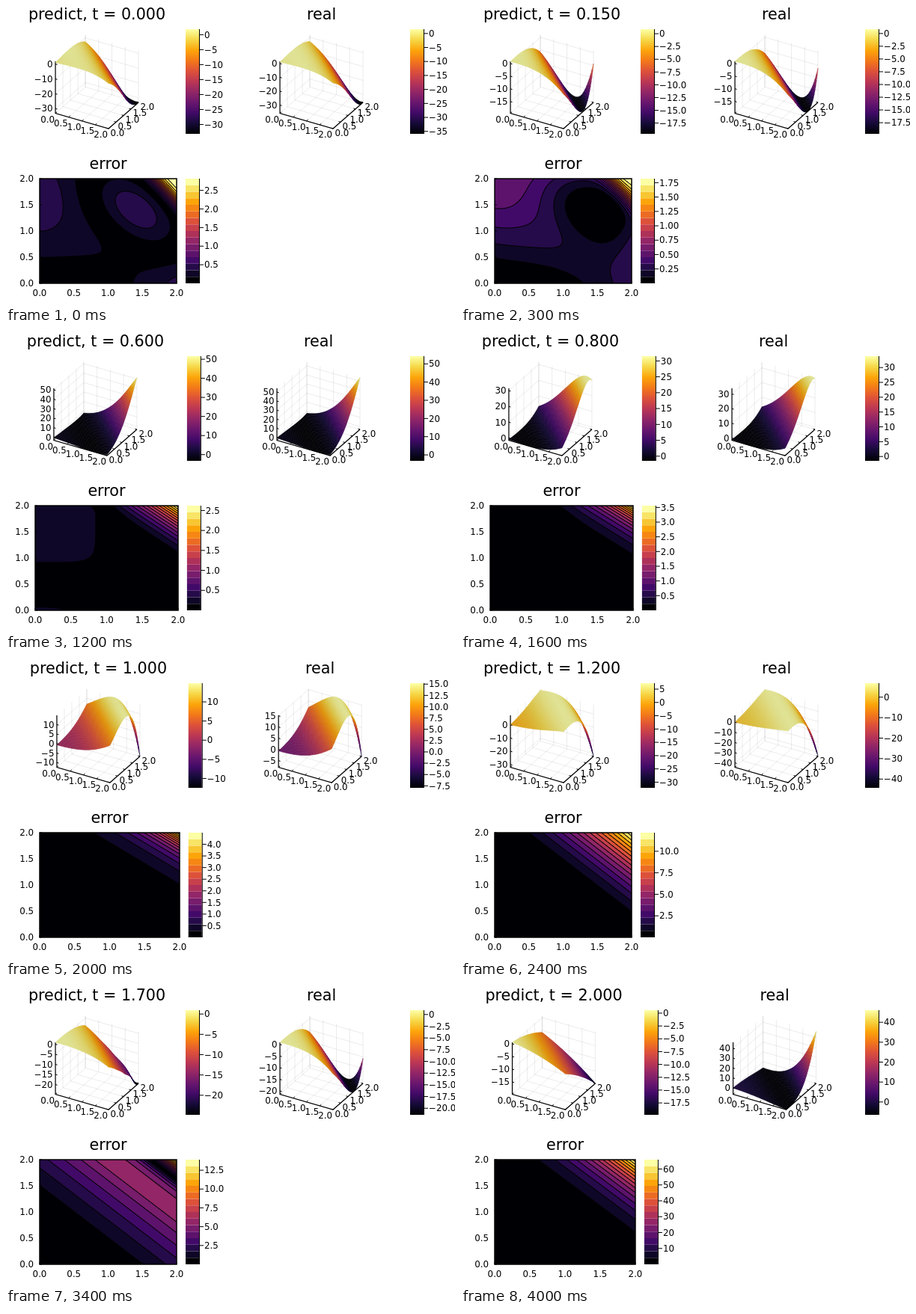
An HTML page with a canvas that plays this animation: 600x400 px, repeating every 4.1 s.

```html
<!DOCTYPE html>
<html lang="en">
<head>
<meta charset="utf-8">
<title>Prediction error</title>
<style>
html, body { margin: 0; width: 100%; height: 100%; overflow: hidden; background: #fff; }
canvas { display: block; }
</style>
</head>
<body>
<canvas id="stage" width="600" height="400"></canvas>
<script>
const ctx = document.getElementById('stage').getContext('2d');
const { exp, cos, max, min, abs, floor, ceil, round } = Math;
const FRAMES = 41, FRAME_MS = 100, CELLS = 40, BANDS = 16, PLOT_H = 140;
const TICK_FONT = '11.8px "DejaVu Sans", sans-serif';
const TITLE_FONT = '20.7px "DejaVu Sans", sans-serif';
const UNIT_TICKS = [0, 0.5, 1, 1.5, 2];
const INFERNO = [[0, 0, 4], [22, 11, 57], [66, 10, 104], [106, 23, 110], [147, 38, 103], [188, 55, 84],
  [221, 81, 58], [243, 120, 25], [252, 165, 10], [246, 215, 70], [252, 255, 164]];

const mix = (a, b, k) => a + (b - a) * k;
const clamp = (v, lo, hi) => max(lo, min(hi, v));

function inferno(v) {
  const p = clamp(v, 0, 1) * 10, i = min(9, floor(p));
  return INFERNO[i].map((c, n) => mix(c, INFERNO[i + 1][n], p - i));
}
const css = (rgb, shade = 1) => `rgb(${rgb.map(c => round(c * shade))})`;

// Catmull-Rom curve through values spaced 0.5 apart
function curve(values, s) {
  const last = values.length - 1, i = min(last - 1, floor(s * 2)), k = s * 2 - i;
  const b = values[i], c = values[i + 1];
  const a = i ? values[i - 1] : 2 * b - c;
  const d = i + 2 <= last ? values[i + 2] : 2 * c - b;
  return b + k / 2 * (c - a + k * (2 * a - 5 * b + 4 * c - d + k * (3 * (b - c) + d - a)));
}

// ---- fields ----
const real = (x, y, t) => exp(x + y) * cos(x + y + 4 * t);
const bump = (x, y, cx, cy, rx, ry) => exp(-(((x - cx) / rx) ** 2) - ((y - cy) / ry) ** 2);

function startError(x, y) {
  const X = x - 1.4, Y = y - 1.4;
  const corner = ((2 - x) / 0.6 + (2 - y) / 0.85) / 0.65;
  return 0.27 + 2.6 * exp(-(corner ** 3))
    - 0.75 * exp(-((0.95 * X - 0.59 * Y) ** 2) - (1.37 * X + 1.3 * Y) ** 2)
    - 0.25 * exp(-((y / 0.55) ** 2)) / (1 + exp((x - 1.2) / 0.25))
    + 0.2 * bump(x, y, 0, 1.65, 0.5, 0.75) + 0.2 * bump(x, y, 2.1, -0.05, 0.4, 0.4);
}
const saddleError = (x, y) => 0.42 * y + 0.16 * x - 0.14
  - 0.55 * bump(x, y, 1.75, 1.62, 0.65, 0.65)
  + 0.2 * bump(x, y, 2.1, 0.6, 0.35, 0.6) + 0.14 * bump(x, y, 2, 2, 0.3, 0.3);
const wedgeError = (x, y) => -2.62 * max(0, 1 - 0.75 * (2 - x + (2 - y) / 0.9)) ** 2
  + 0.2 * exp(-((x / 1.1) ** 6) - ((y - 1.75) / 1.1) ** 6) + 0.2 * bump(x, y, 0, 0, 0.9, 0.12);
const cornerError = (x, y) => -4.5 * exp(-2.22 * (2 - x) - 2.78 * (2 - y));
const rampError = (x, y) => 4.9 * max(0, x + y - 2) ** 2;

const KEYS = [[0, startError], [0.3, saddleError], [0.6, wedgeError], [1, cornerError], [1.45, rampError]];
const LATE = [0, 0.05, 0.15, 0.87, 2.25, 4, 5.5, 2.6, -13.9];

const rampPredict = (x, y) => real(x, y, 1.45) + rampError(x, y);
const latePredict = (x, y) => real(x, y, 1.7) + curve(LATE, x + y);
const endPredict = (x, y) => 0.58 - 1.3 * (x + y) - 0.95 * (x + y) ** 2;

function predict(x, y, t) {
  if (t > 1.7) return mix(latePredict(x, y), endPredict(x, y), (t - 1.7) / 0.3);
  if (t > 1.45) return mix(rampPredict(x, y), latePredict(x, y), (t - 1.45) / 0.25);
  let i = 0;
  while (i < 3 && t >= KEYS[i + 1][0]) i++;
  const [t0, from] = KEYS[i], [t1, to] = KEYS[i + 1];
  let k = (t - t0) / (t1 - t0);
  if (i === 3) k = 1 - (1 - k) ** 2;
  return real(x, y, t) + mix(from(x, y), to(x, y), k);
}

function sample(field, cols, rows) {
  const z = [];
  let lo = Infinity, hi = -Infinity;
  for (let j = 0; j <= rows; j++) for (let i = 0; i <= cols; i++) {
    const v = field(2 * i / cols, 2 * j / rows);
    z.push(v);
    lo = min(lo, v);
    hi = max(hi, v);
  }
  return { z, lo, hi, cols };
}

// ---- drawing helpers ----
function ticks(lo, hi, limit) {
  let step;
  for (let k = -2; !step; k++) step = [1, 2.5, 5].map(m => m * 10 ** k).find(s => (hi - lo) / s <= limit);
  const digits = (String(step).split('.')[1] || '').length;
  const list = [], top = floor(hi / step);
  for (let n = ceil(lo / step); n <= top; n++) {
    const label = n === 0 && top === 0 ? '0' : abs(n * step).toFixed(digits);
    list.push({ v: n * step, label: (n < 0 ? '\u2212' : '') + label });
  }
  return list;
}

function text(str, x, y, align = 'center', font = TICK_FONT) {
  ctx.font = font;
  ctx.textAlign = align;
  ctx.fillStyle = '#000';
  ctx.fillText(str, x, y);
}

function line(points, color = '#000', width = 1) {
  ctx.beginPath();
  points.forEach(p => ctx.lineTo(...p));
  ctx.strokeStyle = color;
  ctx.lineWidth = width;
  ctx.stroke();
}

function colorbar(x, top, { lo, hi }, bands) {
  const h = PLOT_H / bands;
  for (let i = 0; i < bands; i++) {
    ctx.fillStyle = css(inferno(i / (bands - 1)));
    ctx.fillRect(x, top + PLOT_H - (i + 1) * h, 18, h);
  }
  line([[x + 18.5, top], [x + 18.5, top + PLOT_H]]);
  for (const { v, label } of ticks(lo, hi, 10)) {
    const y = top + PLOT_H * (hi - v) / (hi - lo);
    line([[x + 18.5, y], [x + 24, y]]);
    text(label, x + 25, y + 4.2, 'left');
  }
}

function surface(title, left, width, grid, zTicks) {
  const { z, lo, hi } = grid, center = left + width / 2 - 15, ox = center - 55.5;
  const height = v => (v - lo) / (hi - lo);
  const at = (u, v, w) => [ox + 71 * u + 40 * v, 143.5 + 20.5 * u - 35 * v - 69.5 * w];
  const wire = (...pts) => line(pts.map(p => at(...p)), 'rgba(0,0,0,.1)', 0.8);
  for (const n of UNIT_TICKS) {
    const k = n / 2;
    wire([k, 0, 0], [k, 1, 0], [k, 1, 1]);
    wire([1, k, 0], [0, k, 0], [0, k, 1]);
  }
  for (const { v } of zTicks) wire([0, 0, height(v)], [0, 1, height(v)], [1, 1, height(v)]);

  line([at(0, 0, 1), at(0, 0, 0), at(1, 0, 0), at(1, 1, 0)], '#000', 1.2);
  for (let i = 0; i < CELLS; i++) for (let j = CELLS - 1; j >= 0; j--) {
    const corners = [[i, j], [i + 1, j], [i + 1, j + 1], [i, j + 1]];
    let sum = 0;
    ctx.beginPath();
    for (const [a, b] of corners) {
      const w = height(z[b * (CELLS + 1) + a]);
      sum += w;
      ctx.lineTo(...at(a / CELLS, b / CELLS, w));
    }
    ctx.closePath();
    ctx.fillStyle = ctx.strokeStyle = css(inferno(sum / 4), 0.88);
    ctx.lineWidth = 0.5;
    ctx.fill();
    ctx.stroke();
  }

  for (const { v, label } of zTicks) {
    const [x, y] = at(0, 0, height(v));
    line([[x, y], [x + 2.5, y + 0.7]]);
    text(label, x - 3.5, y + 4.2, 'right');
  }
  for (const n of UNIT_TICKS) {
    const [ax, ay] = at(n / 2, 0, 0), [bx, by] = at(1, n / 2, 0);
    line([[ax, ay], [ax + 2, ay - 1.7]]);
    line([[bx, by], [bx - 2.5, by - 0.7]]);
    text(n.toFixed(1), ax - 1, ay + 12, 'right');
    text(n.toFixed(1), bx + 2.5, by + 9.7, 'left');
  }
  text(title, center, 18, 'center', TITLE_FONT);
  colorbar(left + width + 12, 31, grid, 140);
}

function contours(left, width, field) {
  const top = 231, x0 = round(left), cols = round(width);
  const grid = sample(field, cols, PLOT_H);
  grid.lo = max(grid.lo, 1e-6);
  const step = (grid.hi - grid.lo) / BANDS;
  const palette = Array.from({ length: BANDS }, (_, i) => inferno(i / (BANDS - 1)));
  const image = ctx.createImageData(cols, PLOT_H);
  for (let r = 0; r < PLOT_H; r++) for (let c = 0; c < cols; c++) {
    const n = (PLOT_H - 1 - r) * (cols + 1) + c;
    const v = grid.z[n];
    const q = (v - grid.lo) / step;
    const slope = Math.hypot(grid.z[n + 1] - v, grid.z[n + cols + 1] - v) / step;
    const gap = abs(q - clamp(round(q), 1, BANDS - 1)) / (slope + 1e-9);
    const keep = clamp(gap, 0, 1);
    const rgb = palette[clamp(floor(q), 0, BANDS - 1)];
    image.data.set([...rgb.map(k => k * keep), 255], (r * cols + c) * 4);
  }
  ctx.putImageData(image, x0, top);
  ctx.strokeStyle = '#000';
  ctx.lineWidth = 1.5;
  ctx.strokeRect(x0, top, cols, PLOT_H);
  for (const n of UNIT_TICKS) {
    const x = x0 + cols * n / 2, y = top + PLOT_H * (1 - n / 2);
    line([[x, 371], [x, 368]]);
    line([[x0, y], [x0 + 3, y]]);
    text(n.toFixed(1), x, 388);
    text(n.toFixed(1), x0 - 8, y + 4.2, 'right');
  }
  text('error', left + width / 2, 218, 'center', TITLE_FONT);
  colorbar(left + width + 12, top, grid, BANDS);
}

function draw(index) {
  const t = index * 0.05;
  ctx.fillStyle = '#fff';
  ctx.fillRect(0, 0, 600, 400);
  const guess = sample((x, y) => predict(x, y, t), CELLS, CELLS);
  const truth = sample((x, y) => real(x, y, t), CELLS, CELLS);
  const guessTicks = ticks(guess.lo, guess.hi, 6), truthTicks = ticks(truth.lo, truth.hi, 6);

  // The column widths follow the widest axis labels.
  ctx.font = TICK_FONT;
  const pad = labels => 20.2 + max(...labels.map(s => ctx.measureText(s).width));
  const leftPad = pad([...guessTicks.map(k => k.label), '2.0']);
  const rightPad = pad(truthTicks.map(k => k.label));
  const width = (456 - leftPad - rightPad) / 2;

  surface('predict, t = ' + t.toFixed(3), leftPad, width, guess, guessTicks);
  surface('real', 528 - width, width, truth, truthTicks);
  contours(leftPad, width, (x, y) => abs(predict(x, y, t) - real(x, y, t)));
}

let shown = -1;
const start = performance.now();
function tick() {
  const index = floor((performance.now() - start) / FRAME_MS) % FRAMES;
  if (index !== shown) draw(shown = index);
  requestAnimationFrame(tick);
}
tick();
</script>
</body>
</html>
```
